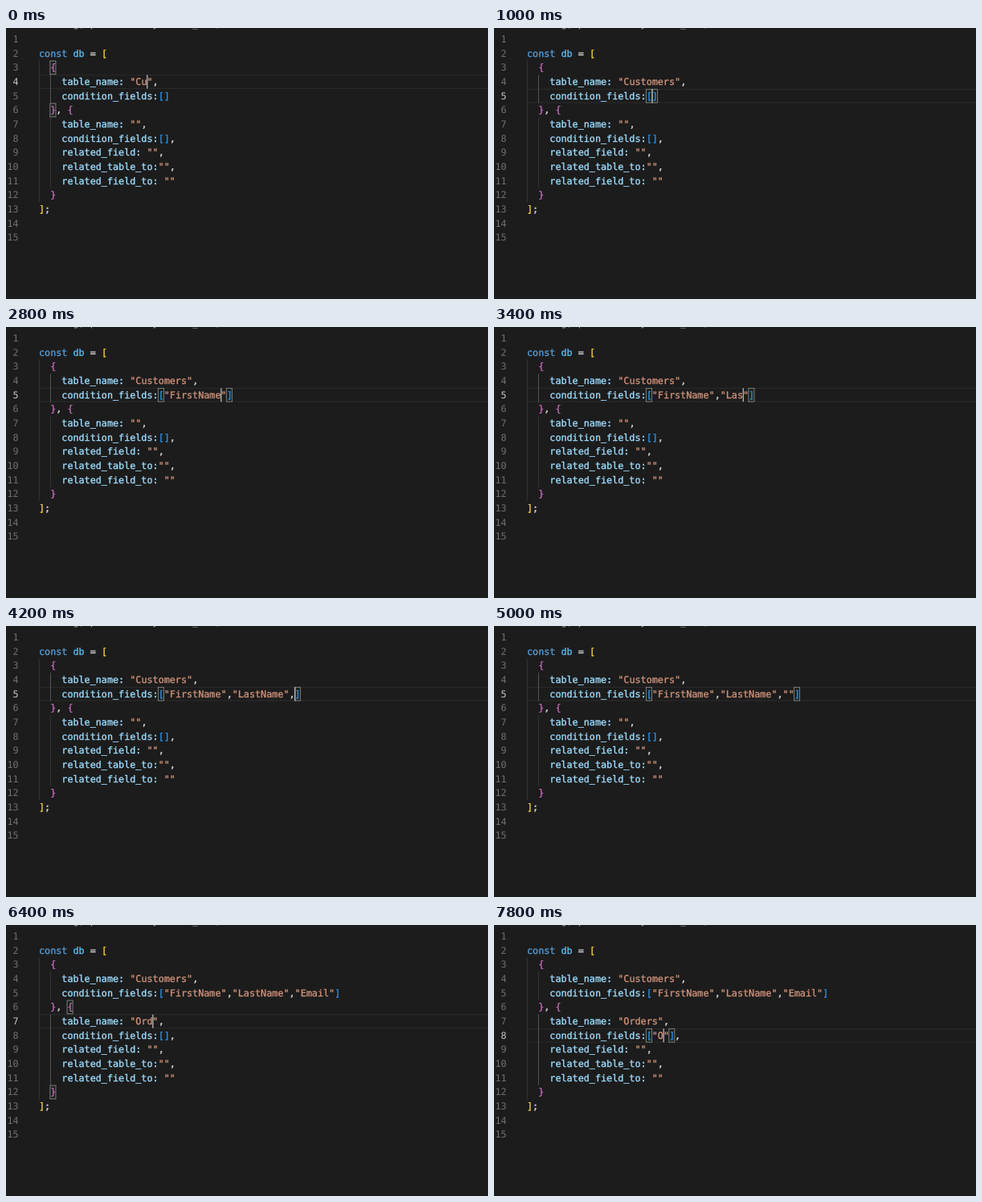
Write an HTML page that moves like this. It is 600 px wide and 338 px high and loops after 8 s.

```html
<!DOCTYPE html>
<html lang="en">
<head>
<meta charset="utf-8">
<title>Code editor</title>
<style>
  html, body { margin: 0; width: 100%; height: 100%; overflow: hidden; background: #1c1c1c; }
  svg { display: block; width: 600px; height: 338px; }
  text {
    font: 11.76px "DejaVu Sans Mono", monospace;
    text-rendering: geometricPrecision;
    font-variant-ligatures: none;
    white-space: pre;
  }
  .code { stroke-width: 0.35px; }
</style>
</head>
<body>
<svg id="stage" viewBox="0 0 600 338"></svg>
<script>
const LOOP = 8000;
const LEFT = 41, CHAR = 7.08, LINE = 17.68, BASE = 17.9;
const BRACKETS = ['#f7cf3c', '#c56cc1', '#2b8fe6'];
const GUIDE = '#343434', ACTIVE_GUIDE = '#555';

// "$" marks the editable part of a line.
const SOURCE = [
  '',
  'const db = [',
  '  {',
  '    table_name: "$",',
  '    condition_fields:[$]',
  '  }, {',
  '    table_name: "$",',
  '    condition_fields:[$],',
  '    related_field: "",',
  '    related_table_to:"",',
  '    related_field_to: ""',
  '  }',
  '];',
  '',
  ''
];

// [time, line, value]; "|" is the caret, missing while it blinks off.
const STEPS = [
  [0, 4, 'Cu|'],
  [200, 4, 'Cust|'],
  [400, 4, 'Custome|'],
  [600, 4, 'Customers|'],
  [1000, 5, '|'],
  [1200, 5, '"|"'],
  [1400, 5, '"F|"'],
  [1600, 5, '"Fi|"'],
  [2000, 5, '"Fi"'],
  [2200, 5, '"Fir|"'],
  [2400, 5, '"First|"'],
  [2600, 5, '"FirstN|"'],
  [2800, 5, '"FirstName|"'],
  [3000, 5, '"FirstName",|'],
  [3200, 5, '"FirstName","L|"'],
  [3400, 5, '"FirstName","Las|"'],
  [3600, 5, '"FirstName","LastN|"'],
  [3800, 5, '"FirstName","LastNam|"'],
  [4000, 5, '"FirstName","LastName|"'],
  [4200, 5, '"FirstName","LastName",|'],
  [4400, 5, '"FirstName","LastName","|"'],
  [5000, 5, '"FirstName","LastName",""'],
  [5200, 5, '"FirstName","LastName","Em|"'],
  [5400, 5, '"FirstName","LastName","Emai|"'],
  [5600, 5, '"FirstName","LastName","Email|"'],
  [6000, 7, '|'],
  [6200, 7, 'O|'],
  [6400, 7, 'Ord|'],
  [6600, 7, 'Order|'],
  [6800, 7, 'Orders|'],
  [7200, 8, '|'],
  [7600, 8, '"|"'],
  [7800, 8, '"O|"']
];

const stage = document.getElementById('stage');
const colX = col => LEFT + col * CHAR;
const baseline = line => BASE + (line - 1) * LINE;
const lineTop = line => baseline(line) - 12.7;

const rect = (x, y, w, h, fill, extra = '') =>
  `<rect x="${x}" y="${y}" width="${w}" height="${h}" fill="${fill}" ${extra}/>`;

const label = (x, y, str, fill, extra = '') =>
  `<text x="${x}" y="${y}" fill="${fill}" ${extra}>${str}</text>`;

const guide = (col, from, to, color) =>
  rect(colX(col) - 0.2, lineTop(from), 1, (to - from + 1) * LINE, color);

const matchBox = (line, col) =>
  rect(colX(col) - 0.3, lineTop(line) + 0.5, CHAR, LINE - 1, '#1d2a1d',
    'fill-opacity=".5" stroke="#7c7c7c"');

function tokenColor(token) {
  if (token[0] === '"') return '#ce9178';
  if (token === 'const') return '#569cd6';
  if (token === 'db') return '#5cbcf2';
  return /^\w+:$/.test(token) ? '#9cdcfe' : '#d4d4d4';
}

function drawCode(lines) {
  let depth = 0, out = '';
  lines.forEach((line, i) => {
    for (const { 0: token, index } of line.matchAll(/"[^"]*"|\w+:?|\S/g)) {
      let color = tokenColor(token);
      if ('[{'.includes(token)) color = BRACKETS[depth++];
      else if (']}'.includes(token)) color = BRACKETS[--depth];
      out += label(colX(index), baseline(i + 1), token, color, `class="code" stroke="${color}"`);
    }
  });
  return out;
}

function draw(count) {
  const values = {};
  for (const [, line, value] of STEPS.slice(0, count)) values[line] = value;
  const active = STEPS[count - 1][1];
  const caret = values[active].indexOf('|');
  const slot = SOURCE[active - 1].indexOf('$');
  const clean = line => (values[line] || '').replace('|', '');
  const lines = SOURCE.map((text, i) => text.replace('$', clean(i + 1)));
  const inFirst = active < 6;

  const matches = {
    4: [[3, 2], [6, 2]],
    7: [[6, 5], [12, 2]]
  }[active] || [[active, slot - 1], [active, slot + clean(active).length]];

  let out = rect(LEFT, lineTop(active), 600 - LEFT, 1, '#2b2b2b')
    + rect(LEFT, lineTop(active + 1) - 1, 600 - LEFT, 1, '#2b2b2b')
    + guide(0, 3, 12, GUIDE)
    + guide(2, 4, 5, inFirst ? ACTIVE_GUIDE : GUIDE)
    + guide(2, 7, 11, inFirst ? GUIDE : ACTIVE_GUIDE)
    + matches.map(([line, col]) => matchBox(line, col)).join('')
    + label(LEFT, -1.2, 'let msg, p = !library.table_one;', '#b4b4b4');

  SOURCE.forEach((_, i) => {
    const color = i + 1 === active ? '#c6c6c6' : '#707070';
    out += label(15.7, baseline(i + 1), i + 1, color, 'text-anchor="end"');
  });

  out += drawCode(lines);
  if (caret >= 0) {
    out += rect(colX(slot + caret) - 0.4, lineTop(active) + 0.3, 1.3, LINE - 0.6, '#b8b9b7');
  }
  stage.innerHTML = out;
}

let shown = 0;
function tick() {
  const time = performance.now() % LOOP;
  const count = STEPS.filter(([start]) => start <= time).length;
  if (count !== shown) draw(shown = count);
  requestAnimationFrame(tick);
}
tick();
</script>
</body>
</html>
```
